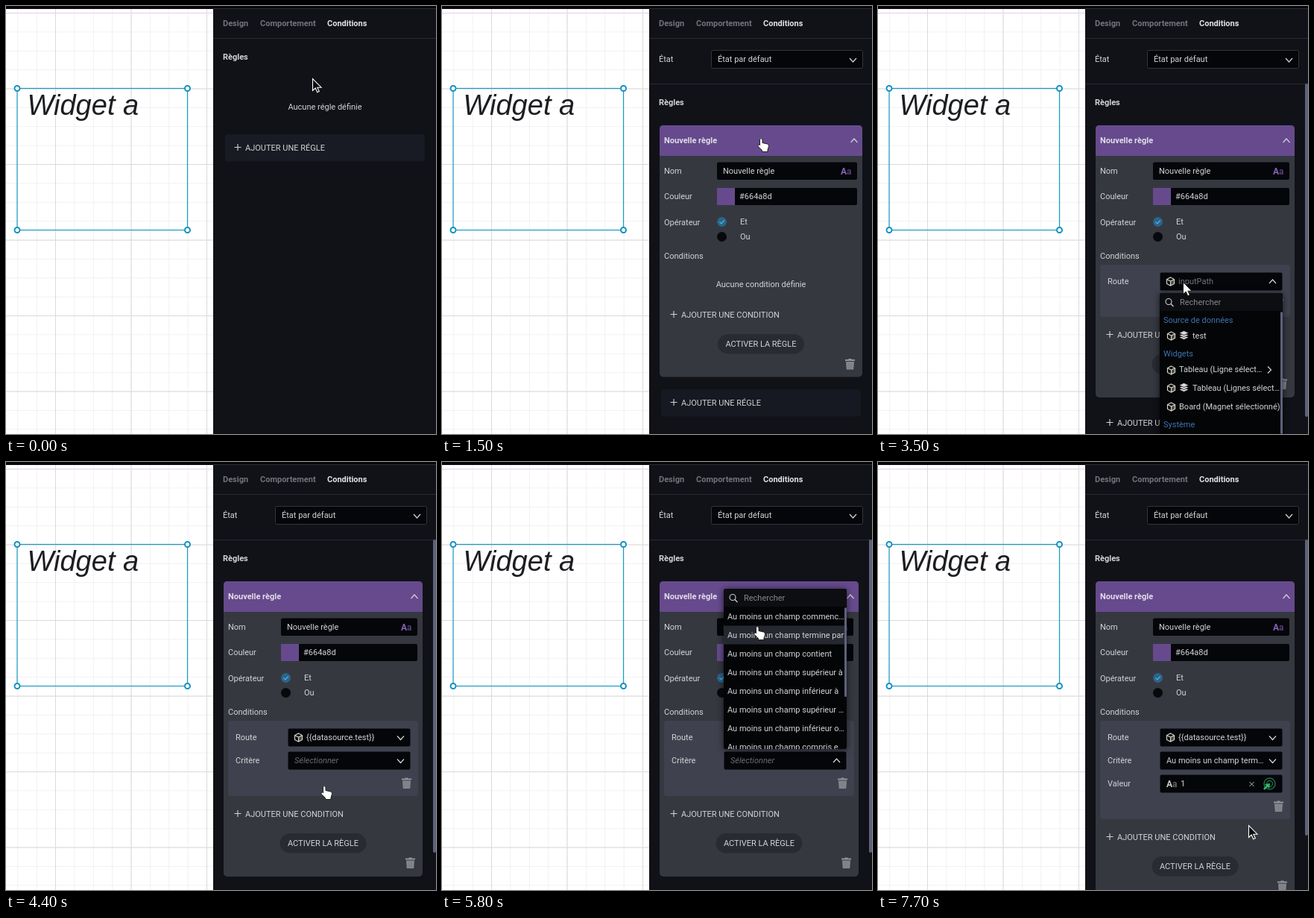
Animation, 577 px wide and 574 px high, one loop 8000 ms. Source, as an HTML page:

```html
<!DOCTYPE html>
<html lang="fr">
<head>
<meta charset="utf-8">
<style>
  html, body { margin: 0; width: 100%; height: 100%; overflow: hidden; background: #111218; }
  svg { display: block; width: 577px; height: 574px; }
  text { font: 11px Roboto, sans-serif; white-space: pre; }
  .b { font-weight: 700; }
  .i { font-style: italic; }
</style>
</head>
<body>
<svg id="stage" viewBox="0 0 577 574"></svg>
<script>
const LOOP = 8000, STEP = 100;
const INK = '#d2d3d6', DIM = '#73747b', BLUE = '#3d74ae', FIELD = '#050609', HOVER = '#252831';

const text = (x, y, s, fill = INK, cls = '', extra = '') =>
  `<text x="${x}" y="${y + 4}" fill="${fill}" class="${cls}" ${extra}>${s}</text>`;
const middle = (x, y, s) => text(x, y, s, INK, '', 'text-anchor="middle"');
const rect = (x, y, r, b, fill, rx = 0, extra = '') =>
  `<rect x="${x}" y="${y}" width="${r - x}" height="${b - y}" rx="${rx}" fill="${fill}" ${extra}/>`;
const line = (d, stroke, w = 1, extra = '') =>
  `<path d="${d}" fill="none" stroke="${stroke}" stroke-width="${w}" ${extra}/>`;
const circle = (x, y, r, fill, extra = '') => `<circle cx="${x}" cy="${y}" r="${r}" fill="${fill}" ${extra}/>`;
const at = (x, y, s) => `<g transform="translate(${x} ${y})">${s}</g>`;

const chevron = (x, y, up) => line(`M${x - 4.5} ${y + (up ? 2.5 : -2)}l4.5 ${up ? -5 : 5}l4.5 ${up ? 5 : -5}`, INK, 1.2);
const plus = (x, y) => line(`M${x - 4.5} ${y}h9M${x} ${y - 4.5}v9`, INK, 1.1);
const trash = (x, y) => at(x, y,
  rect(-2, -7.5, 2, -5, '#92949a') + rect(-6.5, -6.5, 6.5, -4.5, '#92949a') +
  `<path d="M-5.5 -3.5h11l-.8 10.5h-9.4z" fill="#85878d"/>` +
  line('M-2.2 -2v7.5M0 -2v7.5M2.2 -2v7.5', '#777980', .7));
const cube = (x, y) => at(x, y,
  line('M0 -5.5L5 -3V3L0 5.5L-5 3V-3ZM-5 -3L0 -.5L5 -3M0 -.5V5.5', '#d8d4c8', 1.2) +
  `<path d="M0 -.5L5 -3V3L0 5.5Z" fill="#d8d4c8" opacity=".35"/>`);
const layers = (x, y) => at(x, y, [3, 0, -3].map(d =>
  `<path d="M0 ${d - 3.5}l6.5 3l-6.5 3l-6.5 -3z" fill="#dcdcdc" stroke="#08090c" stroke-width=".8"/>`).join(''));
const letters = (x, y, big, small) =>
  text(x, y, 'A', big, 'b', 'style="font-size:12px"') +
  text(x + 8, y, 'a', small, 'b', 'style="font-size:12px"');
const lens = (x, y) => circle(x - 1, y - 1, 4, 'none', `stroke="${INK}" stroke-width="1.1"`) +
  line(`M${x + 2} ${y + 2}l3.5 3.5`, INK, 1.2);

function board() {
  let s = rect(0, 0, 278, 574, '#fff');
  const grid = (step, color) => {
    let d = '';
    for (let x = 66.5 - 101.5; x < 278; x += step) d += `M${x} 4V574`;
    for (let y = 111 - 101.5; y < 574; y += step) d += `M0 ${y}H278`;
    return line(d, color);
  };
  s += grid(25.375, '#f1f1f1') + grid(101.5, '#dadada') + line('M0 9.5H278', '#e5cfe8');
  s += '<text x="28.5" y="146" fill="#1c1e22" style="font:italic 38px Liberation Sans,Arial,sans-serif">Widget a</text>';
  s += rect(15, 110.5, 243.5, 300.5, 'none', 0, 'stroke="#1b98c6" stroke-width="1.2"');
  for (const x of [15, 243.5]) for (const y of [110.5, 300.5])
    s += circle(x, y, 3.5, '#fff', 'stroke="#1491c0" stroke-width="2"');
  return s;
}

const frame = () => board() + rect(278, 0, 577, 574, '#111218') + rect(0, 0, 577, 4, '#07060b') +
  line('M278 3.5H577M278 43.5H577', '#2a2b32') +
  text(291, 23, 'Design', DIM, 'b') + text(341, 23, 'Comportement', DIM, 'b') +
  text(431, 23, 'Conditions', '#e2e3e5', 'b');

const addRule = (y, glow) =>
  rect(294, y - 18, 562, y + 18.5, '#181b23', 4, `opacity="${glow}"`) +
  plus(311, y - .5) + text(321, y, 'AJOUTER UNE RÉGLE');

const select = (y, content, open) =>
  rect(378.5, y - 12, 542.5, y + 12, FIELD, 2) + content + chevron(529.5, y, open);

// Rows of the condition block: route, criterion, value
function conditions(st) {
  const { rows, t } = st;
  const bottom = 417 + 31 * (rows - 1);
  let s = rect(298, 347, 553, bottom, '#3f424e', 4);
  s += text(308, 369, 'Route') + select(369.5, cube(392.5, 369.5) + (t < 4300
    ? text(403, 369, 'inputPath', DIM) : text(403, 369, '{{datasource.test}}')), st.routeOpen);
  if (rows > 1) s += text(308, 400, 'Critère') + select(400.5, t < 6000
    ? text(387, 400, 'Sélectionner', '#6c6d74', 'i') : text(387, 400, 'Au moins un champ term…'), st.testOpen);
  if (rows > 2) {
    s += text(308, 431, 'Valeur') + rect(378.5, 419.5, 542.5, 443.5, FIELD, 2) + letters(387, 432, '#c9cabf', '#66675f');
    if (t >= 7100) s += text(406, 431, '1') + line('M498.5 429l6 6m0 -6l-6 6', '#b9babd', 1);
    s += circle(525.5, 431.5, 7.5, 'none', 'stroke="#1d6b43" stroke-width="1.6"') +
      circle(525.5, 431.5, 4, 'none', 'stroke="#1d6b43" stroke-width="1.4"') +
      '<path d="M526 431l-1 7l-2.2 -2.2l-4 4l-1.8 -1.8l4 -4l-2 -2z" fill="#2fb872"/>';
  }
  return s + trash(537.5, bottom - 17);
}

function card(st) {
  const { rows, t } = st, R = rows ? 559 : 564;
  const add = rows ? 441 + 31 * (rows - 1) : 414;
  const end = rows ? add + 84 : 497.5;
  let s = text(291, 71, 'État') +
    rect(361.5, 59.5, 564.5, 83.5, FIELD, 2, 'stroke="#34353c"') + text(370, 71, 'État par défaut') + chevron(551.5, 72) +
    line('M278 104.5H577', '#2a2b32') + text(291, 129, 'Règles', INK, 'b');
  s += rect(292, 160, R, end, '#363840', 5) +
    `<path d="M292 201V165q0 -5 5 -5H${R - 5}q5 0 5 5V201z" fill="#664a8d"/>` +
    text(298, 180, 'Nouvelle règle', '#e0dde6', 'b') + chevron(R - 11, 180.5, true);
  s += text(298, 221, 'Nom') + rect(369, 209.5, R - 7, 233, FIELD, 2) + text(377, 221, 'Nouvelle règle') +
    letters(R - 29, 222, '#8a62bd', '#543f75');
  s += text(298, 255, 'Couleur') + rect(369, 244, R - 7, 267, FIELD, 2) + rect(369, 244, 393, 267, '#664a8d') +
    text(399, 255, '#664a8d');
  s += text(298, 290, 'Opérateur') + circle(375.5, 289.5, 6.5, '#2a648b') +
    line('M372.5 289.5l2.3 2.3l4 -4.5', '#55b5e6', 1.2) + text(400, 289, 'Et') +
    circle(375.5, 309.5, 6.5, '#08090c') + text(400, 309, 'Ou') + text(298, 335, 'Conditions');
  s += rows ? conditions(st) : middle(428, 373, 'Aucune condition définie');
  if (st.addHover) s += rect(298, 400, 558, 429, '#1b1d26', 4);
  s += plus(311, add - .5) + text(321, add, 'AJOUTER UNE CONDITION');
  const mid = (R + 292) / 2, act = rows ? add + 39 : 453;
  s += rect(mid - 58, act - 13, mid + 58, act + 13.5, '#282b33', 13.5) + middle(mid, act, 'ACTIVER LA RÈGLE');
  s += trash(R - 16.5, rows ? add + 66 : 480.5);
  s += addRule(rows ? add + 118 : 532, Math.max(0, 1 - (t - 1400) / 500));
  if (rows) s += rect(573, 104, 577, [551, 524, 501][rows - 1], '#5d617c', 2);
  return s;
}

const popup = (y, b) => rect(378, y, 543, b, '#040507', 3, 'style="filter:drop-shadow(0 1px 4px #000a)"') +
  rect(378, y, 543, y + 24, '#0d0e12', 3) + lens(391, y + 12.5) + text(405, y + 12, 'Rechercher', '#85868c');

function routeList(hover) {
  let s = popup(385, 590);
  if (hover) s += rect(378, 430, 540, 455, HOVER);
  s += text(383, 421, 'Source de données', BLUE) + text(383, 466, 'Widgets', BLUE) + text(383, 561, 'Système', BLUE);
  for (const y of [442, 488, 512, 537]) s += cube(393.5, y + .5);
  s += layers(410.5, 442) + text(422, 442, 'test') + text(404, 487, 'Tableau (Ligne sélect…') +
    line('M523 483.5l4.5 4.5l-4.5 4.5', INK, 1.2) +
    layers(410.5, 512) + text(422, 512, 'Tableau (Lignes sélect…') + text(404, 537, 'Board (Magnet sélectionné)');
  return s + rect(540, 410, 543, 574, '#5d617c', 1.5);
}

const TESTS = ['commenc…', 'termine par', 'contient', 'supérieur à', 'inférieur à', 'supérieur …', 'inférieur o…', 'compris e…'];
function testList(hover) {
  let s = popup(170, 385) + '<clipPath id="list"><path d="M378 194H543V385H378z"/></clipPath><g clip-path="url(#list)">';
  TESTS.forEach((name, i) => {
    const y = 207 + 25 * i;
    if (i === hover) s += rect(378, y - 12.5, 543, y + 12.5, HOVER);
    s += text(383, y, 'Au moins un champ ' + name);
  });
  return s + '</g>' + rect(540, 195, 543, 315, '#5d617c', 1.5);
}

// Pointer path: time, x, y, shape
const PATH = [
  [0, 411, 97, 'arrow'], [300, 440, 8, 'hand'], [500, 441, 11, 'hand'], [700, 441, 11, 'arrow'],
  [1100, 424, 172, 'hand'], [1200, 423, 177, 'hand'], [1500, 423, 177, 'hand'], [1700, 424, 205, 'arrow'],
  [2200, 425, 301, 'arrow'], [2300, 425, 301, 'arrow'], [2400, 425, 388, 'arrow'], [2500, 425, 388, 'arrow'],
  [2600, 421, 399, 'hand'], [2700, 421, 399, 'hand'], [2800, 421, 402, 'hand'], [3000, 425, 403, 'arrow'],
  [3100, 425, 403, 'arrow'], [3300, 409, 370, 'white'], [3700, 409, 370, 'white'], [3900, 416, 408, 'hand'],
  [4100, 422, 434, 'hand'], [4400, 422, 434, 'hand'], [4600, 424, 408, 'white'], [4700, 424, 408, 'white'],
  [4900, 424, 403, 'white'], [5200, 424, 403, 'white'], [5300, 422, 350, 'hand'], [5500, 421, 229, 'hand'],
  [5700, 421, 229, 'hand'], [5800, 418, 220, 'hand'], [6000, 418, 220, 'arrow'], [6600, 446, 424, 'beam'],
  [7100, 446, 424, 'arrow'], [7400, 488, 474, 'arrow'], [7500, 488, 474, 'arrow'], [7700, 497, 487, 'arrow']
];
const ARROW = 'M.5 .5V16.5L4.2 13L6.7 18.8L9.3 17.6L6.8 12.2H12Z';
const SHAPES = {
  arrow: `<path d="${ARROW}" fill="#0b0b0e" stroke="#fff" stroke-width="1.1"/>`,
  white: `<path d="${ARROW}" fill="#fff" stroke="#111" stroke-width=".9"/>`,
  hand: '<path d="M3.5 2Q5.2 -.8 7 2V6.5L13.5 8Q16 8.6 15.5 11.2L14 16V18.5H6.5V16.5L1 11.3Q.2 8.8 2.6 9L3.5 9.8Z" fill="#fff" stroke="#111" stroke-width=".9"/>',
  beam: line('M-3 0H3M-3 16H3M0 0V16', '#fff', 1.2)
};
function pointer(t) {
  const i = PATH.findLastIndex(k => k[0] <= t);
  const [t0, x0, y0, shape] = PATH[i], [t1, x1, y1] = PATH[i + 1] || [LOOP, x0, y0];
  const u = (t - t0) / (t1 - t0);
  return at(x0 + (x1 - x0) * u, y0 + (y1 - y0) * u, SHAPES[shape]);
}

function render(t) {
  const st = {
    t,
    rows: t < 2900 ? 0 : t < 4300 ? 1 : t < 6100 ? 2 : 3,
    addHover: t >= 2800 && t < 2900,
    routeOpen: t >= 3500 && t < 4300,
    testOpen: t >= 4800 && t < 6000
  };
  let s = frame();
  if (t < 1500) s += text(291, 68, 'Règles', INK, 'b') + middle(428, 135, 'Aucune régle définie') + addRule(190, 1);
  else s += card(st);
  if (st.routeOpen) s += routeList(t >= 4000);
  if (st.testOpen) s += testList(t < 5400 ? -1 : 1);
  return s + pointer(t);
}

const stage = document.getElementById('stage');
const start = performance.now();
let shown = -1;
function tick() {
  const t = Math.floor((performance.now() - start) % LOOP / STEP) * STEP;
  if (t !== shown) stage.innerHTML = render(shown = t);
  requestAnimationFrame(tick);
}
tick();
</script>
</body>
</html>
```
